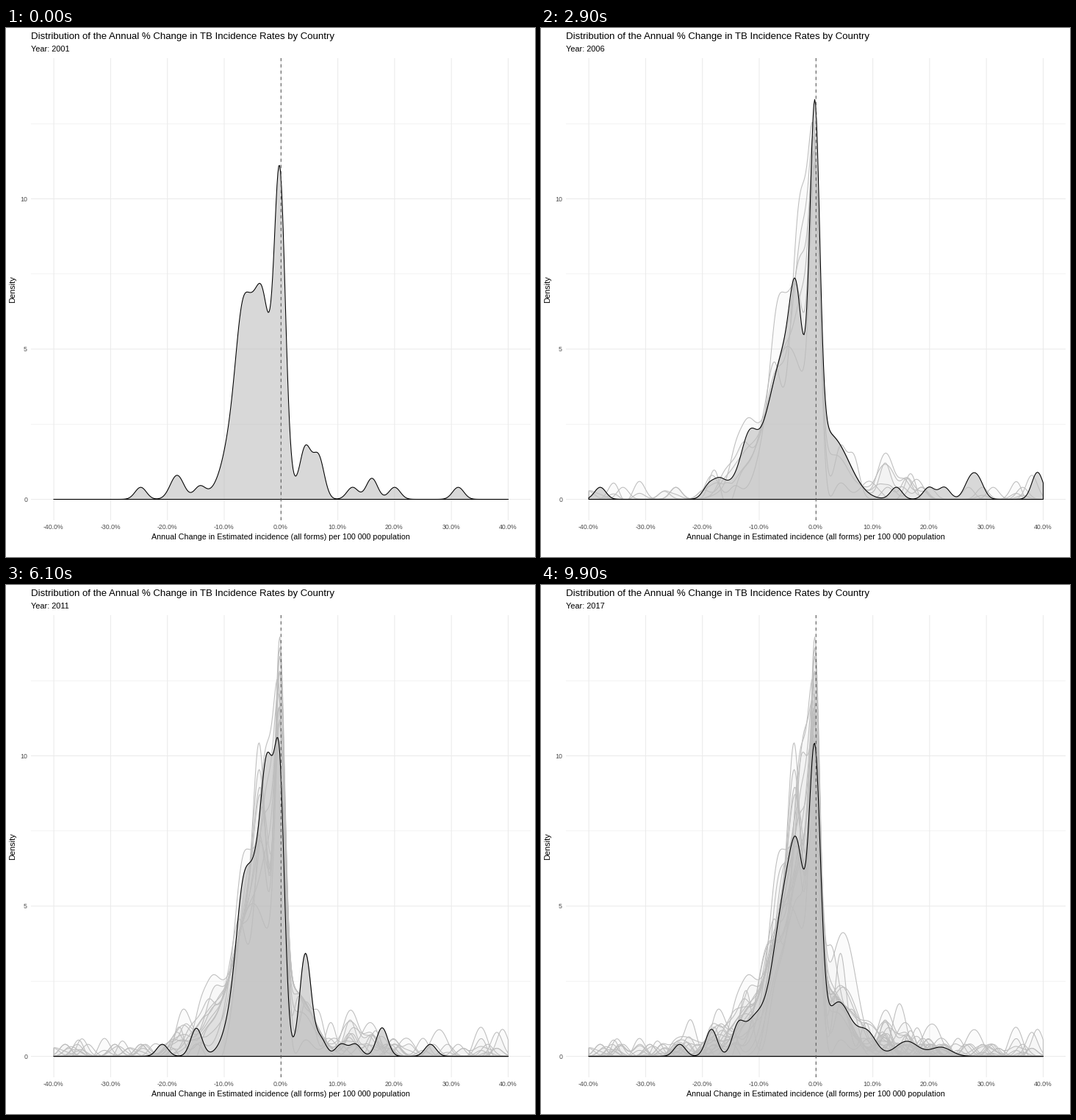
Animation of 720 by 720 pixels, one loop 10000 ms. Source, as a matplotlib script:

```python
import numpy as np
import matplotlib.pyplot as plt
from matplotlib.animation import FuncAnimation
from matplotlib.patches import Polygon

plt.rcParams["font.family"] = "Liberation Sans"

SIZE, FRAMES = 720, 100
FIRST_YEAR, STATES = 2001, 17
TRAIL_STEP = 5
GREY = 190 / 255
LINE = 1.07
X0, X_UNIT = 374.3, 7.73    # pixel of 0 % and pixels per percent
Y0, Y_UNIT = 641.5, 40.9    # pixel of density 0 and pixels per unit
X = np.linspace(-40, 40, 512)


def bump(x, centre, height, width=1.0):
    return height * np.exp(-0.5 * ((x - centre) / width) ** 2)


def density(peak, *bumps, loners=(), width=0.95):
    """Sum of bumps with a spike near zero that brings the top to `peak`."""
    parts = [*bumps, *((x, 0.4) for x in loners)]
    spike = peak - sum(bump(-0.2, *p) for p in parts)
    return sum(bump(X, *p) for p in [*parts, (-0.2, spike, width)])


def typical(seed, peak, *bumps):
    """A usual year: broad decline, short right tail, seeded lone countries."""
    rng = np.random.default_rng(seed)
    side = rng.choice([-1, 1], 12)
    loners = side * np.minimum(11 + rng.exponential(8, 12), 38)
    return density(peak, (-5, 5, 3.2), (-12.5, 0.8, 3), (3, 1.9, 3), *bumps,
                   loners=loners, width=0.85)


def before(blend, after, t):
    """Curve that gives `blend` when moved the share t towards `after`."""
    return np.maximum((blend - t * after) / (1 - t), 0)


def make_curves():
    c = {
        2001: density(11.08, (-5, 6.5, 3), (-7, 1.2), (-3.1, 1.5), (4.3, 1.65),
                      (6.6, 1.4), (-18.3, .8, 1.2), (16, .7),
                      loners=(-24.7, -14.3, 12.6, 20, 31.2)),
        2002: typical(2002, 11.2, (-11.8, 1, 1.5)),
        2003: typical(2003, 11.6, (-2, 4.5, 1.3), (-40, .4)),
        2005: typical(2005, 11.4, (-2.3, 4, 1.5)),
        2006: typical(2006, 13.3, (-3.6, 2.6), (39, .9)),
        2008: typical(2008, 13.4, (-3.7, 4.3, 1.1)),
        2009: typical(2009, 13.95, (-3.8, 5.6)),
        2010: typical(2010, 12.8, (-3.6, 4.2, 1.1)),
        2011: density(10.03, (-5, 6, 2.6), (-6.9, 1.1), (-2.2, 6.3, 1.2),
                      (4.3, 3.4), (6.9, .6), (-14.9, .93), (17.8, .95),
                      loners=(-20.9, 10.6, 13.1, 26.3), width=.85),
        2012: typical(2012, 11.3, (-2.1, 6.5, 1.2), (2.7, 1.5)),
        2014: typical(2014, 11.2, (-2.2, 3, 1.3), (-22.1, 1.2)),
        2015: density(11.2, (-3, 5, 2), (-7, 2.2, 1.8), (4.8, 2.3, 2.6),
                      (14.7, 1.75, 1.2), loners=(-27, -18, 20.5, 30.5)),
        2017: density(10.4, (-5, 5.6, 2.4), (-3.1, 2.8, 1.2), (-11, 1.1, 1.8),
                      (4, 1.8, 2.2), (9, .75, 1.6), (-18.4, .9), (-13.8, .8),
                      (16, .5, 2), (22, .3, 1.8), loners=(-24, ), width=1),
    }
    mid_2005 = density(11.75, (-2.6, 8.7, 1.6), (-7.5, 3.3, 2.6), (-7.2, 1),
                       (-13, .9, 1.3), (4, .95, 1.6), (9.5, .5, 2.2),
                       (-17.8, .75), (16.8, .73),
                       loners=(-35.5, -31.1, 35.3))
    mid_2008 = density(12.2, (-5, 6.2, 2.5), (-3, 3.6, 1.1), (3, 1.9, 1.1),
                       (5.3, 1.2), (8.7, .85), (-14.7, .5, 1.5),
                       (15.7, .75, 1.6), (35.2, .65, 1.2),
                       loners=(-35.1, -28.1, -19, 12, 20.2, 25), width=.85)
    mid_2014 = density(11.17, (-8.6, 3.3, 1.9), (-2.6, 6.2, 2.6), (5, 1.6, 2.6),
                       (9.8, .8, 1.5), (-22.4, .65), (18.8, .6, 1.2),
                       (29.5, .38, 1.8),
                       loners=(-34.5, -31, -14.5, 12.7, 22.7))
    mid_2016 = density(10.87, (-3, 5.7, 2.2), (-7.2, 1.7, 1.4), (4.8, 3.2, 2.4),
                       (-12.3, 1.1, 1.1), (-17, .5, 1.6), (-23.5, .33, 3),
                       (14.8, .85, 1.2), loners=(11.8, 20.5, 30.7), width=1)
    c[2004] = before(mid_2005, c[2005], 1 / 3)
    c[2007] = before(mid_2008, c[2008], 1 / 3)
    c[2013] = before(mid_2014, c[2014], 1 / 4)
    c[2016] = before(mid_2016, c[2015], 1 / 2)
    return c


curves = make_curves()


def progress(frame):
    """State index and share of the way to the next state."""
    if frame < 3:
        return 0, 0
    state, step = divmod(frame - 3, 6)
    if state >= STATES - 1:
        return STATES - 1, 0
    length = 3 if state < 12 else 4
    t = (step + 1) / length
    return (state, t) if t < 1 else (state + 1, 0)


def outline(frame):
    state, t = progress(frame)
    y = curves[FIRST_YEAR + state]
    if t:
        y = (1 - t) * y + t * curves[FIRST_YEAR + state + 1]
    return np.vstack([[X[0], 0], np.column_stack([X, y]), [X[-1], 0]])


def label_year(frame):
    state, t = progress(frame)
    return FIRST_YEAR + (round(state + 0.5) if t else state)


fig = plt.figure(figsize=(SIZE / 72, SIZE / 72), dpi=72, facecolor="white")


def text(x, y, s, size=11, color="black", **kw):
    return fig.text(x / SIZE, 1 - y / SIZE, s, size=size, color=color, **kw)


# Panel limits follow from the pixel scales.
LEFT, RIGHT, TOP, BOTTOM = X0 - 44 * X_UNIT, X0 + 44 * X_UNIT, 41, 670
ax = fig.add_axes([LEFT / SIZE, 1 - BOTTOM / SIZE,
                   (RIGHT - LEFT) / SIZE, (BOTTOM - TOP) / SIZE])
ax.set(xlim=(-44, 44), ylim=((Y0 - BOTTOM) / Y_UNIT, (Y0 - TOP) / Y_UNIT))
ax.axis("off")

grid = dict(color="#ebebeb", zorder=0, snap=False)
for y in (2.5, 7.5, 12.5):
    ax.axhline(y, lw=LINE / 2, **grid)
for y in (0, 5, 10):
    ax.axhline(y, lw=LINE, **grid)
    text(29, Y0 + 3.2 - Y_UNIT * y, str(y), 8.8, "#4d4d4d", ha="right")
for x in range(-40, 41, 10):
    ax.axvline(x, lw=LINE, **grid)
    text(X0 + X_UNIT * x - 0.5, 682, f"{x:.1f}%", 8.8, "#4d4d4d", ha="center")

text(34, 15, "Distribution of the Annual % Change in TB Incidence Rates by Country", 13.2)
subtitle = text(34, 32, "")
text(374, 696, "Annual Change in Estimated incidence (all forms) per 100 000 population",
     10.7, ha="center")
text(9.5, 355.5, "Density", rotation=90, ha="center", va="center")


def add_shape(frame, edge, alpha, zorder):
    shape = Polygon(outline(frame), closed=True, fc=(GREY, GREY, GREY, alpha),
                    ec=edge, lw=LINE, joinstyle="round", zorder=zorder)
    return ax.add_patch(shape)


trail_frames = [*range(0, FRAMES, TRAIL_STEP), FRAMES - 2]
trail = [add_shape(f, (GREY,) * 3, 0.06, 2 + i / 100)
         for i, f in enumerate(trail_frames)]
current = add_shape(0, "black", 0.6, 4)
ax.axvline(0, color="#555555", lw=LINE, ls=(0, (4, 4)), zorder=5, snap=False)


def update(frame):
    for f, shape in zip(trail_frames, trail):
        shape.set_visible(f < frame)
    current.set_xy(outline(frame))
    subtitle.set_text(f"Year: {label_year(frame)}")
    return [*trail, current, subtitle]


anim = FuncAnimation(fig, update, frames=FRAMES, interval=100,
                     repeat=True, repeat_delay=0)
plt.show()
```
